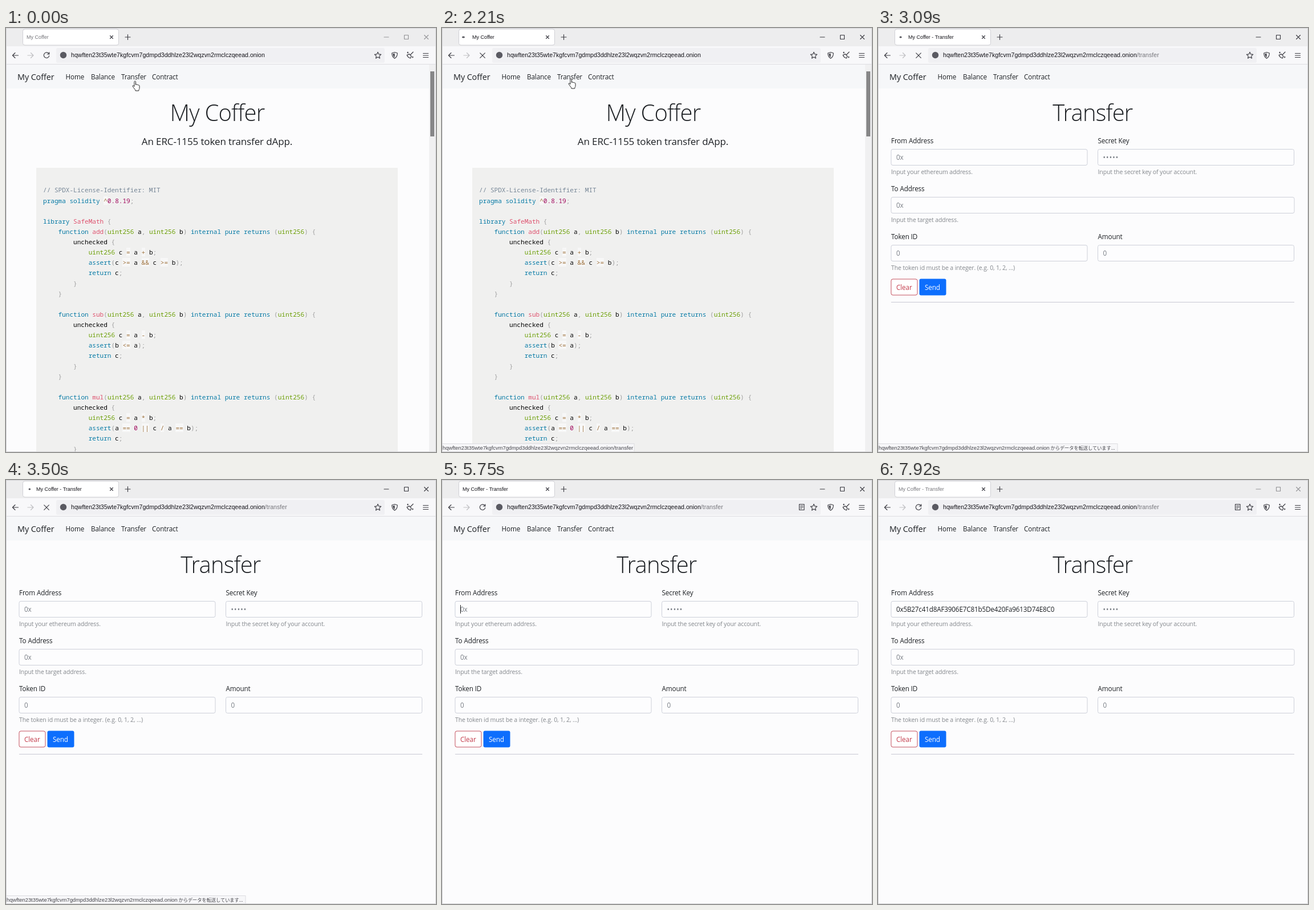
Write an HTML page that moves like this. It is 754 px wide and 743 px high and loops after 8 s.

```html
<!DOCTYPE html>
<html lang="en">
<head>
<meta charset="utf-8">
<title>My Coffer</title>
<style>
  html, body { margin: 0; width: 100%; height: 100%; overflow: hidden; background: #fcfcfd; }
  #stage { position: relative; width: 754px; height: 743px; overflow: hidden; }
  svg, pre { position: absolute; left: 0; top: 0; }
  text { white-space: pre; }
  .ui { font: 10.6px "Liberation Sans", Arial, sans-serif; fill: #15141a; }
  .tab { font-size: 9px; }
  .status { font-size: 9.35px; fill: #45454b; }
  .jp { font: 8.2px "Noto Sans CJK JP", "Noto Sans CJK", sans-serif; }
  .page { font: 11.7px "Open Sans", "Noto Sans", sans-serif; letter-spacing: -.01em; fill: #1d2024; }
  .brand { font-size: 14.4px; }
  .lead { font-size: 17px; text-anchor: middle; }
  .title { font-size: 40px; font-weight: 300; letter-spacing: -.02em; text-anchor: middle; }
  .help { font-size: 10.5px; fill: #83878c; }
  .hint { fill: #7a7f86; }
  .secret { letter-spacing: .1em; }
  .address { letter-spacing: -.015em; }
  .field { fill: #fdfdfe; stroke: #cdd0d9; }
  .icon { fill: none; stroke: #3c3c43; stroke-width: 1.15; stroke-linecap: round; stroke-linejoin: round; }
  .cursor { fill: #fff; stroke: #222; stroke-width: 1; stroke-linejoin: round; }
  pre {
    box-sizing: border-box; margin: 0; left: 53px; top: 245px; width: 634px; height: 498px;
    padding: 30.4px 12px 0; overflow: hidden; background: #f0f0ef; color: #000;
    font: 11.07px/18.12px "Noto Sans Mono", "DejaVu Sans Mono", monospace; text-shadow: 0 1px #fff;
  }
  .comment { color: #708090; }
  .keyword { color: #00749f; }
  .builtin { color: #690; }
  .name { color: #d84c68; }
  .number { color: #905; }
  .operator { color: #9a6e3a; background: #ffffff80; }
  .punctuation { color: #999; }
</style>
</head>
<body>
<div id="stage">
<svg width="754" height="743">
  <rect width="754" height="743" fill="#fcfcfd"/>
  <rect width="754" height="32" fill="#ededee"/>
  <rect y="32" width="754" height="31" fill="#f8f8fa"/>
  <rect y="63" width="754" height="1" fill="#dedee2"/>
  <rect y="64" width="754" height="42" fill="#f6f7f9"/>

  <rect x="29.5" y="2" width="168" height="28" rx="3.5" fill="#fff" stroke="#cfcfd5"/>
  <ellipse id="dot" cy="16" fill="#55555c"/>
  <text id="tabText" class="ui tab" y="19"></text>
  <path class="icon" d="M182.5 13.5l5 5m0-5l-5 5M209 16h9m-4.5-4.5v9"/>
  <path id="windowButtons" class="icon" d="M663 16h8M698.5 12.5h7v7h-7zM733.5 12.5l7 7m0-7l-7 7"/>

  <rect x="88" y="35" width="576" height="26" rx="3" fill="#f0f0f3"/>
  <path class="icon" d="M21.5 48h-10m4.5-4.5l-4.5 4.5 4.5 4.5"/>
  <path class="icon" opacity=".3" d="M38 48h10m-4.5-4.5l4.5 4.5-4.5 4.5"/>
  <path id="reload" class="icon" d="M75.3 45.3a4.8 4.8 0 1 0 .5 3.4M75.8 42.5v3.5h-3.5"/>
  <path id="stop" class="icon" d="M66.8 43.8l8.500 8.500m0-8.500l-8.500 8.500"/>
  <circle cx="100.5" cy="47.5" r="5.7" fill="#5a5a62"/>
  <text class="ui" x="114" y="51.3">hqwften23t35wte7kgfcvm7gdmpd3ddhlze23l2wqzvn2rmclczqeead.onion<tspan id="path" fill="#77777d">/transfer</tspan></text>
  <path id="reader" class="icon" d="M626.5 42.5h8.5v10h-8.5zM628.5 45h4.5m-4.5 2.5h4.5m-4.5 2.5h2.5"/>
  <path class="icon" d="M652 42.2l1.7 3.7 4 .5-3 2.7.8 4-3.5-2-3.5 2 .8-4-3-2.7 4-.5z"/>
  <path class="icon" d="M681.5 42.5l4.8 1.500c0 4.500-1.500 7.500-4.800 9.300-3.300-1.800-4.800-4.800-4.800-9.300z"/>
  <path fill="#3c3c43" d="M681.5 44.5v7c-2.200-1.500-3-3.500-3.100-6.200z"/>
  <path class="icon" d="M714 42l-4.5 4.5M707 45.5l3.8 3.8M707 45.5c-1.5 1.5-2.5 1.8-4 1.8 1 3 3 5 6.5 5.7 0-1.7.3-2.5 1.3-3.7M704.5 42v2m-1-1h2M713 50v2m-1-1h2"/>
  <path class="icon" d="M731.5 44.5h9m-9 3.5h9m-9 3.5h9"/>

  <g class="page">
    <text class="brand" x="20" y="91">My Coffer</text>
    <text x="104.5" y="90">Home</text>
    <text x="149" y="90">Balance</text>
    <text x="202" y="90">Transfer</text>
    <text x="256" y="90">Contract</text>
  </g>

  <g id="home" class="page">
    <rect x="742" y="64" width="12" height="679" fill="#f0f0f1"/>
    <rect x="744" y="76" width="7" height="114" fill="#878788"/>
    <text class="title" x="370.5" y="162.5">My Coffer</text>
    <text class="lead" x="370" y="205.3">An ERC-1155 token transfer dApp.</text>
  </g>

  <g id="form" class="page">
    <text class="title" x="376.5" y="162.5">Transfer</text>
    <g id="fields"></g>
    <g id="ring" fill="none">
      <rect x="21" y="210.5" width="348" height="32" rx="4" stroke="#0d6efd" stroke-opacity=".25" stroke-width="3"/>
      <rect x="23" y="212.5" width="344" height="28" rx="3" stroke="#86b7fe"/>
    </g>
    <text id="address" class="address" x="32" y="231">0x5B27c41d8AF3906E7C81b5De420Fa9613D74E8C0</text>
    <rect id="caret" y="219" width="1" height="15" fill="#222"/>
    <rect x="23" y="440" width="46" height="28" rx="3" fill="#fff" stroke="#c4505e"/>
    <text x="32" y="458.5" fill="#c43c4c">Clear</text>
    <rect x="72.5" y="439.5" width="47" height="29" rx="3" fill="#0d6efd"/>
    <text x="82" y="458.5" fill="#fff">Send</text>
    <path d="M23 480.5h707" stroke="#c9c9d3"/>
  </g>
</svg>

<pre id="code"></pre>

<svg width="754" height="743">
  <g id="status">
    <rect id="statusBox" x="-1" y="728.5" height="16" fill="#f7f7f9" stroke="#dcdce0"/>
    <text class="ui status" x="1" y="739">hqwften23t35wte7kgfcvm7gdmpd3ddhlze23l2wqzvn2rmclczqeead.onion<tspan id="statusPath">/transfer</tspan><tspan id="statusData" class="jp"> からデータを転送しています...</tspan></text>
  </g>
  <path id="hand" class="cursor" d="M3.5 10V2c0-2 2.5-2 2.5 0v5c.5-1 2.3-.8 2.5.3.6-.8 2-.5 2.2.5.8-.5 1.800 0 1.800 1.200v4c0 1.500-1.300 2.500-1.300 4.500H5.500c0-2-2-3.500-3.300-5.500L.7 9.700c-.6-1.200.8-2 1.700-.9z"/>
  <path id="arrow" class="cursor" d="M0 0v13l3-2.8 2 4.6 2-.9-2-4.4h4z"/>
  <path id="beam" fill="none" stroke="#444" d="M-3-5.5h2.3L0-5 .7-5.5H3M0-5V5M-3 5.5h2.3L0 5l.7.5H3"/>
  <rect x=".5" y=".5" width="753" height="742" fill="none" stroke="#d3d3d6"/>
</svg>
</div>

<script>
const LOOP = 8000;
const $ = id => document.getElementById(id);
const clamp = v => Math.min(1, Math.max(0, v));
const ramp = (t, from, to) => clamp((t - from) / (to - from));
const ease = p => p * p * (3 - 2 * p);
const within = (t, from, to) => t >= from && t < to;
const show = (id, on) => { $(id).style.display = on ? '' : 'none'; };
const place = (id, x, y) => $(id).setAttribute('transform', `translate(${x} ${y})`);

// Highlighted contract
const method = (name, op, check) => `
    function ${name}(uint256 a, uint256 b) internal pure returns (uint256) {
        unchecked {
            uint256 c = a ${op} b;
            assert(${check});
            return c;
        }
    }
`;
const source = '// SPDX-License-Identifier: MIT\npragma solidity ^0.8.19;\n\nlibrary SafeMath {'
  + method('add', '+', 'c >= a && c >= b')
  + method('sub', '-', 'b <= a')
  + method('mul', '*', 'a == 0 || c / a == b');

const token = new RegExp([
  '(?<comment>//.*)',
  '(?<keyword>\\b(?:pragma|solidity|library|function|internal|pure|returns?|assert)\\b)',
  '(?<builtin>uint256)',
  '(?<name>SafeMath|\\b(?:add|sub|mul)\\b)',
  '(?<number>\\d[\\d.]*)',
  '(?<operator>&&|\\|\\||[<>=]=|[\\^=+*/-])',
  '(?<punctuation>[{}();,])'
].join('|'), 'g');

let end = 0;
for (const match of source.matchAll(token)) {
  const span = document.createElement('span');
  span.className = Object.keys(match.groups).find(key => match.groups[key]);
  span.textContent = match[0];
  $('code').append(source.slice(end, match.index), span);
  end = match.index + match[0].length;
}
$('code').append(source.slice(end));

// Form fields: x, top of box, width, label, placeholder, help, extra class
$('fields').innerHTML = [
  [23, 212.5, 344, 'From Address', '0x', 'Input your ethereum address.'],
  [385.5, 212.5, 344, 'Secret Key', '•••••', 'Input the secret key of your account.', 'secret'],
  [23, 296.5, 707, 'To Address', '0x', 'Input the target address.'],
  [23, 380.5, 344, 'Token ID', '0', 'The token id must be a integer. (e.g. 0, 1, 2, ...)'],
  [385.5, 380.5, 344, 'Amount', '0', '']
].map(([x, y, width, label, hint, help, extra = ''], i) => `
  <text x="${x}" y="${y - 11}">${label}</text>
  <rect class="field" x="${x}" y="${y}" width="${width}" height="28" rx="3"/>
  <text class="hint ${extra}" id="hint${i}" x="${x + 9}" y="${y + 18.5}">${hint}</text>
  <text class="help" x="${x}" y="${y + 43.5}">${help}</text>`).join('');

const CLICK = 1210, COMMIT = 2920, PAINT = 3090, LOADED = 3590;
const FOCUS = 5750, PASTE = 6420, BLUR = 7500;

function render(t) {
  const loading = within(t, CLICK, LOADED);
  const committed = t >= COMMIT;

  // Browser frame
  $('tabText').textContent = committed ? 'My Coffer - Transfer' : 'My Coffer';
  $('tabText').setAttribute('x', loading ? 53 : 36);
  $('tabText').style.fill = within(t, CLICK, BLUR) ? '#15141a' : '#77777c';
  const active = ramp(t, CLICK, 1360) - ramp(t, 7700, 7920);
  $('windowButtons').style.opacity = 0.5 + 0.5 * active;

  const phase = (t - 3000) / 1050 * 2 * Math.PI;
  show('dot', loading);
  $('dot').setAttribute('cx', 42 - 4.5 * Math.sin(phase));
  $('dot').setAttribute('rx', 1.7 + 0.8 * Math.abs(Math.sin(phase)));
  $('dot').setAttribute('ry', 1.6);

  const stopShown = within(t, 1600, LOADED);
  show('stop', stopShown);
  show('reload', !stopShown);
  const turn = loading ? -150 * ramp(t, 1300, 1500) : 0;
  $('reload').setAttribute('transform', `rotate(${turn} 71 48)`);
  show('path', committed);
  show('reader', t >= LOADED);

  show('status', within(t, 540, LOADED));
  show('statusPath', !committed);
  show('statusData', committed);
  $('statusBox').setAttribute('width', committed ? 421 : 338);

  // Page
  const onForm = t >= PAINT;
  show('home', !onForm);
  show('code', !onForm);
  show('form', onForm);
  show('hint0', t < PASTE);
  show('address', t >= PASTE);
  $('ring').style.opacity = ramp(t, FOCUS, FOCUS + 150) - ramp(t, BLUR, BLUR + 150);
  const blinkStart = t < PASTE ? FOCUS : PASTE;
  show('caret', within(t, FOCUS, BLUR) && (t - blinkStart) % 1000 < 500);
  $('caret').setAttribute('x', t < PASTE ? 32 : 311);

  // Pointer
  show('hand', t < COMMIT);
  place('hand', 221.5, 92.5 - 4 * ease(ramp(t, 40, 540)));
  const move = ease(ramp(t, 3750, 4340));
  const x = 228 + 89 * move, y = 97 + 137 * move;
  const overField = y > 212;
  show('arrow', within(t, 3750, 5590) && !overField);
  show('beam', within(t, 3750, 5590) && overField);
  place('arrow', x, y);
  place('beam', x, y);
}

const start = performance.now();
function tick() {
  render((performance.now() - start) % LOOP);
  requestAnimationFrame(tick);
}
tick();
</script>
</body>
</html>
```
